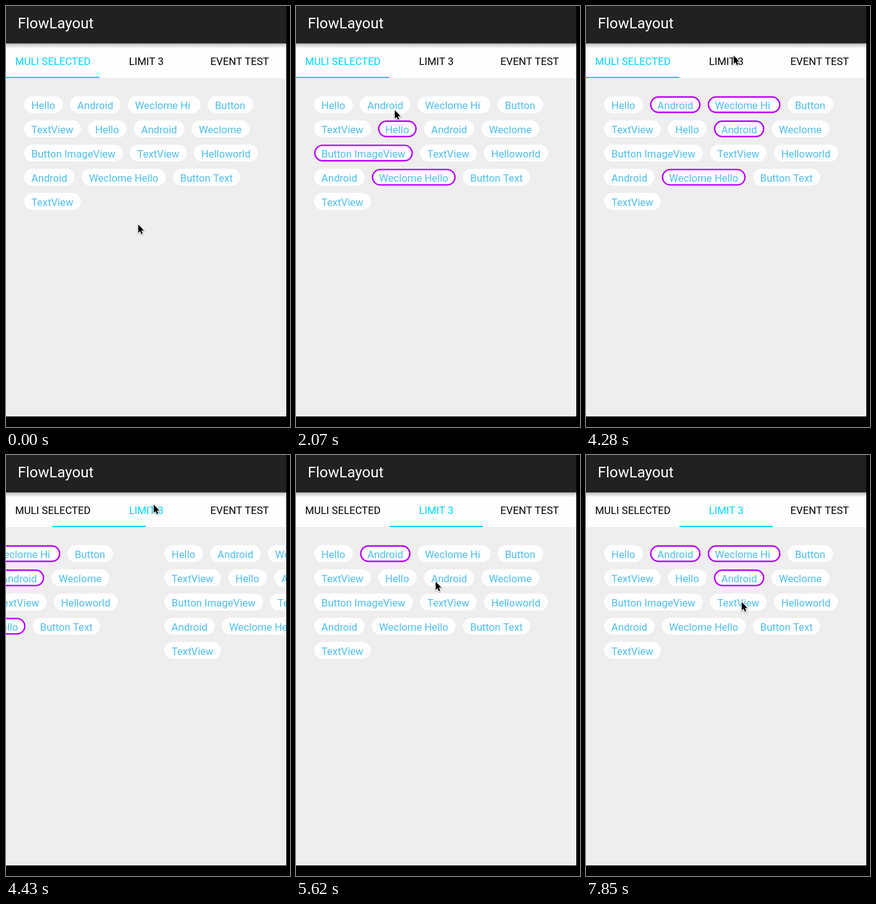
Animation of 459 by 678 pixels, one loop 7.99 s. Source, as an HTML page with a canvas:

```html
<!DOCTYPE html>
<html lang="en">
<head>
<meta charset="utf-8">
<title>FlowLayout</title>
<style>
  html, body { margin: 0; width: 100%; height: 100%; overflow: hidden; background: #000; }
  canvas { display: block; width: 459px; height: 678px; }
</style>
</head>
<body>
<canvas id="stage"></canvas>
<script>
const LOOP = 7990, BEATS = 54, BEAT = LOOP / BEATS, LEAD = 20;
const WIDTH = 459, HEIGHT = 678, SCREEN_W = 453, SCREEN_H = 661;
const TAB_W = SCREEN_W / 3, TAB_BOTTOM = 116;
const CYAN = '#00d4fb', CHIP_TEXT = '#4fbdec', RING = '#bb00ff';
const TEXT_SIZE = 16.7, TITLE_SIZE = 24;
const CHIP_H = 27.2, CHIP_PAD = 11.8, CHIP_GAP = 11.6, ROW_PITCH = 38.95;
const MARGIN = 29.3, FLOW_TOP = 145.3;

const tabs = ['MULI SELECTED', 'LIMIT 3', 'EVENT TEST'];
const labels = [
  'Hello', 'Android', 'Weclome Hi ', 'Button', 'TextView', 'Hello', 'Android', 'Weclome',
  'Button ImageView', 'TextView', 'Helloworld', 'Android', 'Weclome Hello', 'Button Text', 'TextView'
];

// Pointer stops: beat of arrival, x, y, chip tapped one beat later.
const TAB_TAP = 29;
const stops = [
  [0, 213, 351], [2, 194, 387], [6, 200, 281], [7, 200, 281, 12],
  [10, 157, 241, 8], [12, 165, 205, 5], [14, 159, 167, 1], [16, 235, 163, 2],
  [18, 240, 199, 6], [20, 189, 206, 5], [23, 172, 238, 8],
  [TAB_TAP, 238, 79], [32, 238, 79],
  [35, 165, 165, 1], [38, 225, 203], [41, 250, 165, 2], [43, 265, 200, 6],
  [46, 246, 248], [50, 157, 241], [53, 251, 236]
];

const canvas = document.getElementById('stage');
const ctx = canvas.getContext('2d');
const ratio = window.devicePixelRatio || 1;
canvas.width = WIDTH * ratio;
canvas.height = HEIGHT * ratio;

const clamp = v => Math.min(1, Math.max(0, v));
const smooth = p => p * p * (3 - 2 * p);
const mix = (a, b, p) => a + (b - a) * p;

function setFont(size) {
  ctx.font = `${size}px Roboto, sans-serif`;
}

function rect(x, y, w, h, fill) {
  ctx.fillStyle = fill;
  ctx.fillRect(x, y, w, h);
}

function text(label, x, y, size, color, align = 'left') {
  setFont(size);
  ctx.textAlign = align;
  ctx.fillStyle = color;
  ctx.fillText(label, x, y);
}

function pill(x, y, w, h) {
  ctx.beginPath();
  ctx.roundRect(x, y, w, h, h / 2);
}

// Places chips left to right and wraps at the right margin.
function flow() {
  setFont(TEXT_SIZE);
  let x = MARGIN, y = FLOW_TOP;
  return labels.map(label => {
    const w = Math.ceil(ctx.measureText(label).width) + 2 * CHIP_PAD;
    if (x + w > SCREEN_W - MARGIN) {
      x = MARGIN;
      y += ROW_PITCH;
    }
    const chip = { label, x, y, w };
    x += w + CHIP_GAP;
    return chip;
  });
}
const chips = flow();

// A chip is selected after an odd number of taps on its page.
function isSelected(index, page, beat) {
  const taps = stops.filter(([at, , , chip]) =>
    chip === index && at < beat && (at > TAB_TAP) === (page === 1));
  return taps.length % 2 === 1;
}

function drawPage(page, beat) {
  chips.forEach(({ label, x, y, w }, i) => {
    pill(x, y, w, CHIP_H);
    ctx.fillStyle = '#fefefe';
    ctx.fill();
    if (isSelected(i, page, beat)) {
      pill(x + 1.2, y + 1.2, w - 2.4, CHIP_H - 2.4);
      ctx.strokeStyle = RING;
      ctx.lineWidth = 2.4;
      ctx.stroke();
    }
    text(label, x + CHIP_PAD, y + 20.6, TEXT_SIZE, CHIP_TEXT);
  });
}

function drawPages(beat) {
  const slide = clamp((beat - TAB_TAP) / 2);
  ctx.save();
  ctx.beginPath();
  ctx.rect(0, TAB_BOTTOM, SCREEN_W, SCREEN_H - TAB_BOTTOM);
  ctx.clip();
  ctx.translate(-slide * SCREEN_W, 0);
  if (slide < 1) drawPage(0, beat);
  ctx.translate(SCREEN_W, 0);
  if (slide > 0) drawPage(1, beat);
  ctx.restore();
}

function drawBars(beat) {
  rect(0, 0, SCREEN_W, 60, '#212121');
  text('FlowLayout', 18.9, 36, TITLE_SIZE, '#fff');
  const shadow = ctx.createLinearGradient(0, 60, 0, 67);
  shadow.addColorStop(0, '#8c8c8c');
  shadow.addColorStop(0.35, '#d8d6d8');
  shadow.addColorStop(1, '#f0f0f0');
  rect(0, 60, SCREEN_W, 7, shadow);
  rect(0, 67, SCREEN_W, TAB_BOTTOM - 67, '#fefefe');

  const active = beat > TAB_TAP ? 1 : 0;
  tabs.forEach((label, i) =>
    text(label, (i + 0.5) * TAB_W + 0.2, 94.5, TEXT_SIZE, i === active ? CYAN : '#000', 'center'));
  const progress = 1 - (1 - clamp((beat - TAB_TAP) / 3)) ** 1.7;
  rect(progress * TAB_W, TAB_BOTTOM - 2, TAB_W, 2, CYAN);
}

// Rests one beat at each stop, then eases to the next.
function pointerAt(beat) {
  const next = stops.findIndex(([at]) => at > beat);
  if (next < 0) return stops[stops.length - 1].slice(1, 3);
  const [left, x0, y0] = stops[next - 1];
  const [arrive, x1, y1] = stops[next];
  const p = smooth(clamp((beat - left - 1) / Math.max(1, arrive - left - 1)));
  return [mix(x0, x1, p), mix(y0, y1, p)];
}

function drawPointer(x, y) {
  ctx.save();
  ctx.translate(x + 0.7, y + 0.8);
  ctx.beginPath();
  ctx.moveTo(0, 0);
  ctx.lineTo(0, 13.4);
  ctx.lineTo(3, 10.6);
  ctx.lineTo(5.1, 15.4);
  ctx.lineTo(7.3, 14.4);
  ctx.lineTo(5.2, 9.8);
  ctx.lineTo(9.4, 9.6);
  ctx.closePath();
  ctx.shadowColor = 'rgba(0,0,0,.35)';
  ctx.shadowBlur = 2 * ratio;
  ctx.shadowOffsetY = ratio;
  ctx.strokeStyle = '#fff';
  ctx.lineWidth = 1.8;
  ctx.stroke();
  ctx.shadowColor = 'transparent';
  ctx.fillStyle = '#000';
  ctx.fill();
  ctx.restore();
}

function draw(t) {
  const beat = Math.min(BEATS - 1, Math.floor((t + LEAD) / BEAT));
  ctx.setTransform(ratio, 0, 0, ratio, 0, 0);
  rect(0, 0, WIDTH, HEIGHT, '#000');
  rect(0, 0, SCREEN_W, SCREEN_H, '#eee');
  drawPages(beat);
  drawBars(beat);
  drawPointer(...pointerAt(beat));
}

const start = performance.now();
function tick() {
  draw((performance.now() - start) % LOOP);
  requestAnimationFrame(tick);
}
tick();
</script>
</body>
</html>
```
